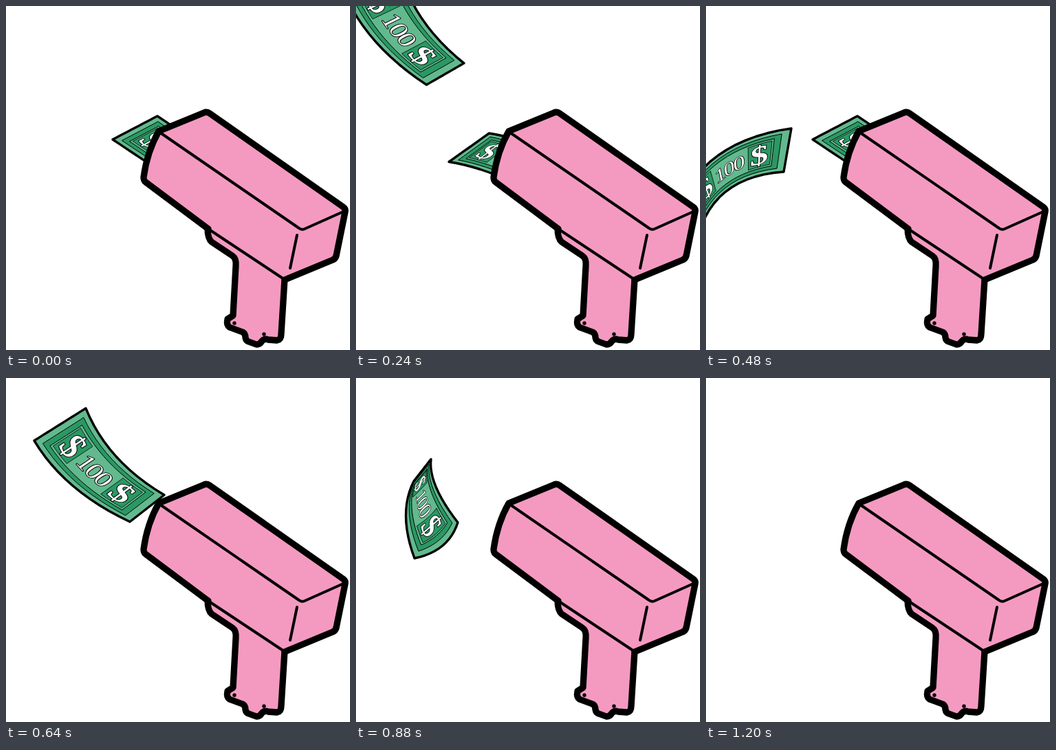
Write an HTML page that moves like this. It is 500 px wide and 500 px high and loops after 1.7 s.

```html
<!DOCTYPE html>
<html lang="en">
<head>
<meta charset="utf-8">
<title>Money gun</title>
<style>
  html, body { margin: 0; width: 100%; height: 100%; overflow: hidden; background: #fff; }
  svg { display: block; width: 100vw; height: 100vh; }
  text { font-family: "Liberation Serif", "Noto Serif", serif; text-anchor: middle;
         fill: #fff; stroke: #000; stroke-width: 2; paint-order: stroke; }
</style>
</head>
<body>
<svg viewBox="0 0 500 500" stroke-linejoin="round" stroke-linecap="round">
  <g id="bills"></g>
  <g fill="#f49ac1" stroke="#000" stroke-width="9.3">
    <path d="M293 323Q293 338 299 343L329 363Q335 367 334 378L330 450L322 455Q320 464 325 467L344 474Q348 476 348 482Q349 487 353 488L364 492Q369 492 372 487Q376 483 381 485L394 486Q400 485 400 477L405 397"/>
    <path d="M405 398L475 369Q479 367 480 363L493 299Q494 295 490 292L296 156Q292 153 288 155L222 182Q205 212 200 249Q200 254 203 256L294 324"/>
    <g fill="none" stroke-width="4">
      <path d="M294 324L401 395Q405 398 410 396"/>
      <path d="M224 184L426 323Q430 326 434 324L490 299"/>
      <path d="M423 333L413 381"/>
    </g>
    <g fill="#000" stroke="none">
      <circle cx="332" cy="461" r="2.7"/>
      <circle cx="375" cy="477" r="2.7"/>
    </g>
  </g>
</svg>
<script>
const NS = "http://www.w3.org/2000/svg";
const LOOP = 1700, STEP = 80, LAST = 15;
const LENGTH = 170, WIDTH = 80;
const LIGHT = "#63b98e", DARK = "#2a9864";

const mix = (a, b, k = 0.5) => a.map((n, i) => n + (b[i] - n) * k);
const mixPose = (p, q, k) => p.map((c, i) => mix(c, q[i], k));

// A pose is the four corners (left top, left bottom, right top, right bottom),
// the sag of the middle and the bow of the right end.
const pose = (lt, lb, rt, rb, sag = [0, 0], bow = [0, 0]) => [lt, lb, rt, rb, sag, bow];

// Turns a pose around its right bottom corner and moves that corner.
function move(p, dx, dy, degrees = 0) {
  const a = degrees * Math.PI / 180, c = Math.cos(a), s = Math.sin(a);
  const spin = ([x, y]) => [x * c - y * s, x * s + y * c];
  const [px, py] = p[3];
  return p.map((q, i) => {
    if (i > 3) return spin(q);
    const [x, y] = spin([q[0] - px, q[1] - py]);
    return [x + px + dx, y + py + dy];
  });
}

const inside = pose([220, 160], [155, 194], [340, 240], [275, 274]);
const out = pose([116, 44], [41, 91], [230, 170], [180, 209], [-13, 7]);
const arch = pose([132, 182], [80, 231], [270, 210], [245, 265], [-4, -18]);
const left = pose([-32, 272], [-6, 318], [124, 178], [113, 241], [-16, -16]);
const curl = pose([109, 118], [84, 150], [148, 210], [85, 262], [-12, -5], [9, 8]);

const peek = move(inside, 35, 28);
const high = move(out, -155, -189, 16);
const low = move(curl, -30, 162, -62);
const fall = k => move(curl, -25 * k, 85 * k);
const launch = [inside, mixPose(inside, out), out, mixPose(out, high)];

const flights = [
  { start: 0, poses: [...launch, high] },
  { start: 2, poses: [peek, mixPose(peek, arch), arch, mixPose(arch, left), left, move(left, -95, 72)] },
  { start: 5, poses: [peek, ...launch, ...[-1, 0, 1, 2].map(fall), low] }
];

// Nested frames, then a dark patch behind each sign
const frame = (inset, fill, line) => ({ box: [inset, inset * 1.6, 1 - inset, 1 - inset * 1.6], fill, line });
const patch = u => ({ box: [u - .095, .22, u + .095, .78], fill: DARK, line: .8 });
const areas = [frame(0, LIGHT, 3.4), frame(.06, DARK, 1), frame(.11, LIGHT, 1), patch(.22), patch(.78)];

const signs = [..."$100$"].map((sign, i) => {
  const big = sign === "$";
  return { sign, u: .5 + (i - 2) * (big ? .14 : .1), size: big ? 52 : 38, weight: big ? 700 : 400 };
});

function add(parent, name, attrs) {
  const el = document.createElementNS(NS, name);
  for (const key in attrs) el.setAttribute(key, attrs[key]);
  return parent.appendChild(el);
}

function point([lt, lb, rt, rb, sag, bow], u, v) {
  const flat = mix(mix(lt, rt, u), mix(lb, rb, u), v);
  const arc = t => 4 * t * (1 - t);
  return flat.map((n, i) => n + arc(u) * sag[i] + arc(v) * u * u * bow[i]);
}

function outline(p, [u0, v0, u1, v1]) {
  const corners = [[u0, v0], [u1, v0], [u1, v1], [u0, v1]];
  const pts = [];
  corners.forEach((a, i) => {
    for (let k = 0; k < 12; k++) {
      const [u, v] = mix(a, corners[(i + 1) % 4], k / 12);
      pts.push(point(p, u, v).map(n => n.toFixed(2)).join(" "));
    }
  });
  return "M" + pts.join("L") + "Z";
}

// Local frame of the bent surface, so that each character lies on it
function lay(p, u) {
  const e = .02;
  const slope = (a, b, size) => a.map((n, i) => (b[i] - n) / (2 * e * size));
  const x = slope(point(p, u - e, .5), point(p, u + e, .5), LENGTH);
  const y = slope(point(p, u, .5 - e), point(p, u, .5 + e), WIDTH);
  return `matrix(${[...x, ...y, ...point(p, u, .5)].map(n => n.toFixed(4)).join(" ")})`;
}

const layer = document.getElementById("bills");
const bills = flights.map(flight => {
  const group = add(layer, "g", {});
  const paths = areas.map(a => add(group, "path", { fill: a.fill, stroke: "#000", "stroke-width": a.line }));
  const texts = signs.map(({ sign, size, weight }) => {
    const el = add(group, "text", { y: size * .33, "font-size": size, "font-weight": weight });
    el.textContent = sign;
    return el;
  });
  return { ...flight, group, paths, texts };
});

function draw(time) {
  const step = Math.min(LAST, Math.floor(time % LOOP / STEP));
  for (const bill of bills) {
    const now = bill.poses[step - bill.start];
    bill.group.setAttribute("display", now ? "inline" : "none");
    if (!now) continue;
    bill.paths.forEach((el, i) => el.setAttribute("d", outline(now, areas[i].box)));
    bill.texts.forEach((el, i) => el.setAttribute("transform", lay(now, signs[i].u)));
  }
}

const begin = performance.now();
function tick() {
  draw(performance.now() - begin);
  requestAnimationFrame(tick);
}
tick();
</script>
</body>
</html>
```
